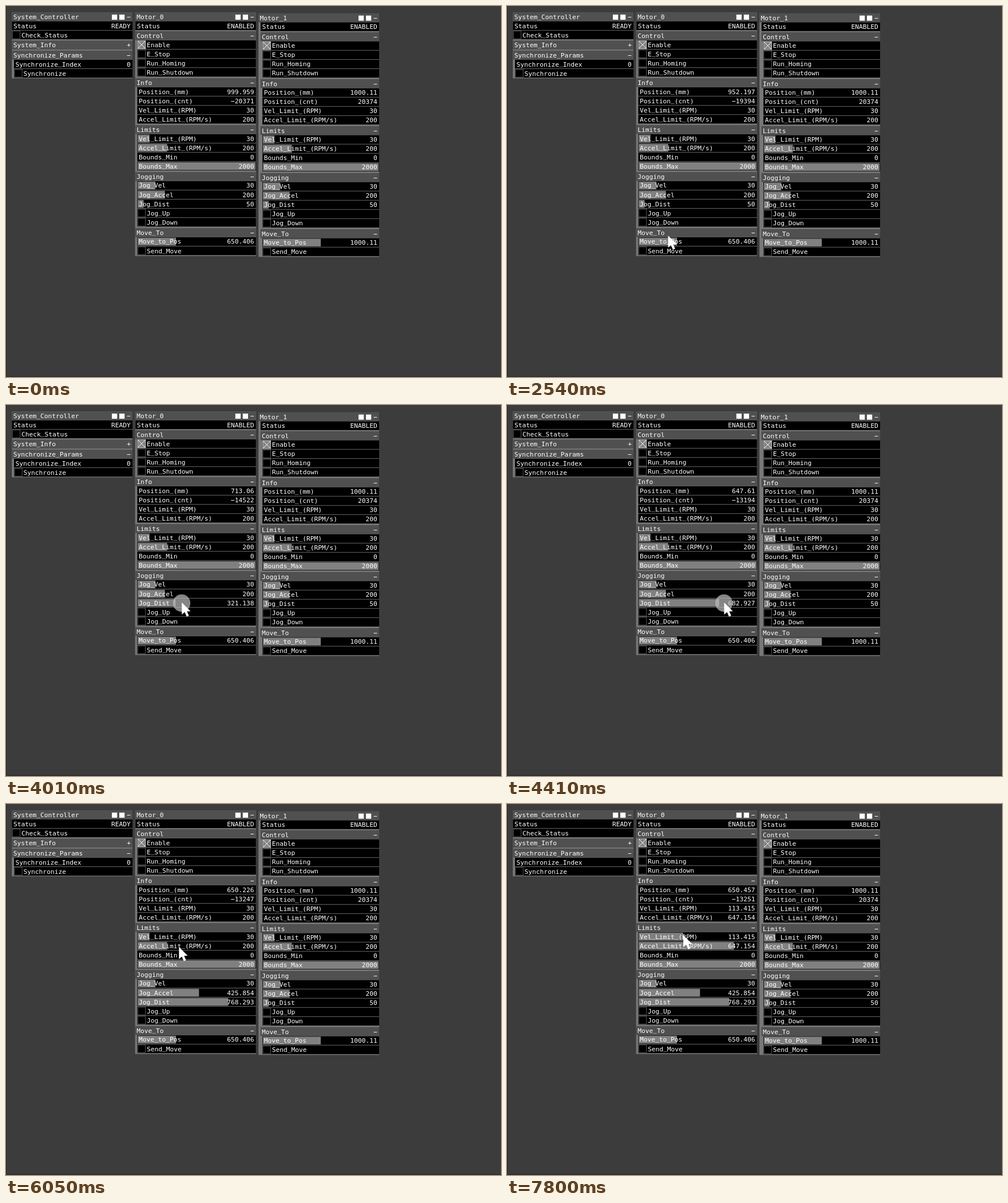
Recreate the animation shown at these times as an HTML page with a canvas. Size 865x648 px, loop 8 s.

```html
<!DOCTYPE html>
<html lang="en">
<head>
<meta charset="utf-8">
<title>Motor control panels</title>
<style>
html, body { margin: 0; width: 100%; height: 100%; overflow: hidden; background: #3c3c3c; }
canvas { display: block; }
</style>
</head>
<body>
<canvas id="stage" width="865" height="648"></canvas>
<script>
const ctx = document.getElementById('stage').getContext('2d');
const LOOP = 8000, LAG = 60, PX = 0.845, ROW = 16.05;
const BORDER = '#787878', HEADER = '#505050', FILL = '#808080';

// Stops of the pointer tip: time, x, y
const path = [
  [620, 538, 640], [1290, 233, 425], [2150, 233, 425], [2540, 281.5, 401],
  [2750, 270, 346], [3659, 266.5, 345], [4569, 389.4, 345], [4650, 389.4, 345],
  [4950, 300, 325], [5250, 337.7, 325], [5480, 337.7, 325], [6150, 300, 245],
  [6481, 300, 245], [7021, 397.8, 245], [7130, 397.8, 245], [7400, 300, 229],
  [7560, 308.1, 229]
];
const travel = [
  [2246, 999.959], [2540, 952.197], [3540, 789.963], [4410, 647.61],
  [5310, 649.917], [6250, 650.31], [7130, 650.31], [7630, 650.457]
];
// When the button is held down
const drags = {
  send: [1900, 2060], dist: [3600, 4640], accel: [4970, 5480],
  accelLimit: [6310, 7090], velLimit: [7420, 7800]
};

const linear = u => u;
const smooth = u => u * u * (3 - 2 * u);

function sample(keys, t, col, ease) {
  const i = keys.findIndex(k => k[0] > t);
  if (i === 0) return keys[0][col];
  if (i < 0) return keys[keys.length - 1][col];
  const a = keys[i - 1], b = keys[i];
  return a[col] + (b[col] - a[col]) * ease((t - a[0]) / (b[0] - a[0]));
}

const minus = s => s.replace('-', '\u2212');
const show = v => typeof v === 'number' ? minus(String(parseFloat(v.toPrecision(6)))) : v;

// Slider value under the pointer, in whole slider steps
function dragged(name, t, rest, min, max) {
  const [start, end] = drags[name];
  if (t < start) return rest;
  const x = sample(path, Math.max(start, Math.min(t, end) - LAG), 1, smooth);
  return min + (max - min) * Math.round((x - 229.6) / PX) / 246;
}

function rect(color, x, y, w, h) {
  ctx.fillStyle = color;
  ctx.fillRect(x, y, w, h);
}

// Underscores sit close to the baseline
function text(s, x, c, align = 'left') {
  ctx.fillStyle = '#fff';
  ctx.textAlign = align;
  ctx.fillText(s.replace(/_/g, '\u00a0'), x, c + 4);
  if (s.includes('_')) ctx.fillText(s.replace(/[^_]/g, '\u00a0'), x, c + 2.6);
}

function header(s, x, right, c, sign = '-') {
  rect(HEADER, x, c - 8, right - x, 15.7);
  text(s, x + 2.4, c);
  text(minus(sign), right - 3, c, 'right');
}

function title(s, x, right, c) {
  header(s, x, right, c);
  for (const d of [36, 23]) rect('#fff', right - d, c - 4.2, 9.2, 9);
}

function row(x, right, c, label, value, frac = 0) {
  rect('#000', x, c - 7.6, right - x, 15.2);
  rect(FILL, x + PX, c - 7.6 + PX, (right - x - 2 * PX) * frac, 15.2 - 2 * PX);
  text(label, x + 2.6, c);
  text(show(value), right - 3.2, c, 'right');
}

function toggle(x, right, c, label, on) {
  rect('#000', x, c - 7.6, right - x, 15.2);
  const l = x + PX, r = l + 13.4, top = c - 6.7, bottom = c + 6.7;
  if (on) rect(FILL, l, top, 13.4, 13.4);
  ctx.strokeStyle = on ? '#ccc' : '#555';
  ctx.strokeRect(l, top, 13.4, 13.4);
  if (on) {
    ctx.strokeStyle = '#fff';
    ctx.beginPath();
    ctx.moveTo(l, top); ctx.lineTo(r, bottom);
    ctx.moveTo(r, top); ctx.lineTo(l, bottom);
    ctx.stroke();
  }
  text(label, x + 16.6, c);
}

// An item is [label, value, fraction]; a boolean value makes a toggle
function group(name, x, right, c, items) {
  rect(BORDER, x, c - 8, right - x, 16.2 + ROW * items.length);
  header(name, x, right, c);
  items.forEach(([label, value, frac], i) => {
    const draw = typeof value === 'boolean' ? toggle : row;
    draw(x + 3.6, right, c + 15.6 + ROW * i, label, value, frac);
  });
  return c + 17.76 + ROW * items.length;
}

function motor(name, x, inner, right, c, m) {
  rect(BORDER, x, c - 8, right - x, 425.4);
  title(name, x, right, c);
  row(inner + 0.4, right, c + 15.3, 'Status', 'ENABLED');
  let y = c + 32.8;
  const add = (label, items) => { y = group(label, inner, right, y, items); };
  add('Control', [['Enable', true], ['E_Stop', false], ['Run_Homing', false], ['Run_Shutdown', false]]);
  add('Info', [['Position_(mm)', m.pos], ['Position_(cnt)', m.count],
    ['Vel_Limit_(RPM)', m.velLimit], ['Accel_Limit_(RPM/s)', m.accelLimit]]);
  add('Limits', [['Vel_Limit_(RPM)', m.velLimit, m.velLimit / 300],
    ['Accel_Limit_(RPM/s)', m.accelLimit, m.accelLimit / 800],
    ['Bounds_Min', 0], ['Bounds_Max', 2000, 1]]);
  add('Jogging', [['Jog_Vel', 30, 0.15], ['Jog_Accel', m.accel, (m.accel - 20) / 780],
    ['Jog_Dist', m.dist, m.dist / 1000], ['Jog_Up', false], ['Jog_Down', false]]);
  add('Move_To', [['Move_to_Pos', m.goal, m.goal / 2000], ['Send_Move', false]]);
}

function system(x, right) {
  rect(BORDER, x, 11.2, right - x, 115);
  title('System_Controller', x, right, 19.2);
  row(x, right, 34.5, 'Status', 'READY');
  toggle(x, right, 50.5, 'Check_Status', false);
  header('System_Info', x, right, 68.4, '+');
  group('Synchronize_Params', x, right, 85.9, [['Synchronize_Index', 0], ['Synchronize', false]]);
}

function pointer(t) {
  if (t < path[0][0]) return;
  const x = sample(path, t, 1, smooth), y = sample(path, t, 2, smooth);
  if (Object.values(drags).some(([a, b]) => t >= a && t < b)) {
    ctx.fillStyle = 'rgba(190,190,190,.7)';
    ctx.beginPath();
    ctx.arc(x - 0.3, y + 1, 15.2, 0, 7);
    ctx.fill();
  }
  const shape = [[0, 0], [0, 21], [5, 16.7], [8.5, 24.6], [12.3, 23], [9, 15.5], [15.2, 15.2]];
  ctx.fillStyle = '#fff';
  ctx.beginPath();
  for (const [dx, dy] of shape) ctx.lineTo(x + dx, y + dy);
  ctx.fill();
}

function draw(t) {
  ctx.font = '11.22px "DejaVu Sans Mono", monospace';
  rect('#3c3c3c', 0, 0, 865, 648);
  rect('#222', 0, 0, 1, 648);
  rect('#332f30', 0, 646, 865, 2);
  system(10.4, 221);
  motor('Motor_0', 225.8, 225.8, 436.8, 19.2, {
    pos: sample(travel, t, 1, linear),
    count: -Math.ceil(20.3718 * sample(travel, t + 1.5, 1, linear)),
    velLimit: dragged('velLimit', t, 30, 0, 300),
    accelLimit: dragged('accelLimit', t, 200, 0, 800),
    accel: dragged('accel', t, 200, 20, 800),
    dist: dragged('dist', t, 50, 0, 1000),
    goal: 650.406
  });
  motor('Motor_1', 441.2, 444.5, 652, 20.9, {
    pos: 1000.11, count: 20374, velLimit: 30, accelLimit: 200, accel: 200, dist: 50, goal: 1000.11
  });
  pointer(t);
}

const begin = performance.now();
function tick() {
  const t = (performance.now() - begin) % LOOP;
  draw(Math.floor(t / 10) * 10);
  requestAnimationFrame(tick);
}
tick();
</script>
</body>
</html>
```
